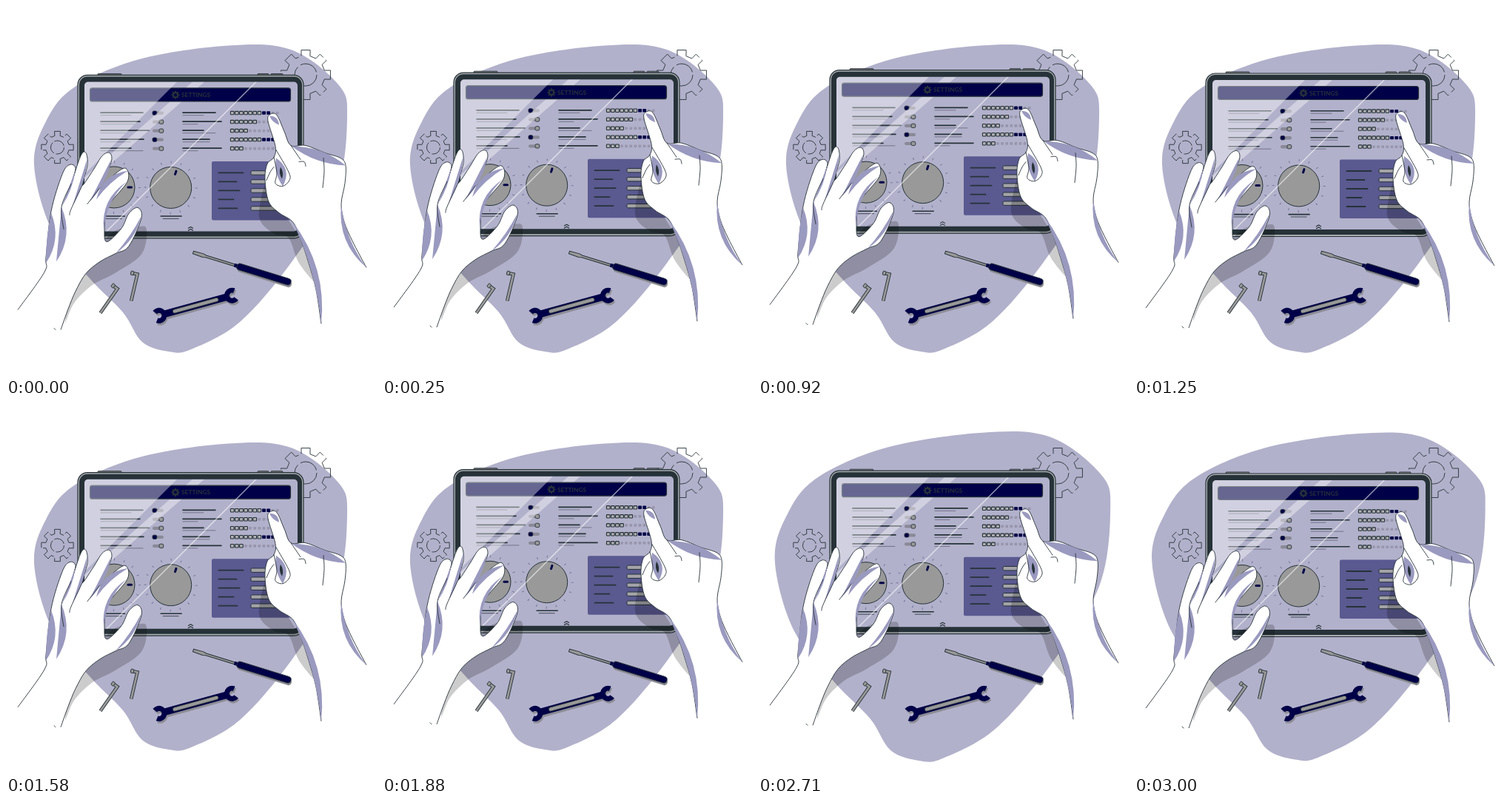
Write an HTML page that moves like this. It is 500 by 500 pixels and loops after 3.04 s.

```html
<!DOCTYPE html>
<html lang="en">
<head>
<meta charset="utf-8">
<title>Settings</title>
<style>
html, body { margin: 0; width: 100%; height: 100%; overflow: hidden; background: #fff }
svg { display: block; width: 100vw; height: 100vh }
text { font: bold 8.4px Lato, sans-serif }
</style>
</head>
<body>
<svg viewBox="0 0 500 500">
  <defs>
    <clipPath id="screen"><rect x="106" y="103" width="288" height="202" rx="5"/></clipPath>
  </defs>
  <g id="blob"></g>
  <g id="still"></g>
  <g id="float"></g>
</svg>
<script>
const DARK = '#263238', NAVY = '#000048', LILAC = '#b2b1cb', SHADE = '#9a99bf', GREY = '#999';
const $ = id => document.getElementById(id);

// Smooth curve through "x,y x,y ..." points
function curve(points, closed) {
  const p = points.split(' ').map(s => s.split(',').map(Number)), n = p.length;
  const at = i => closed ? p[(i + n) % n] : p[Math.max(0, Math.min(n - 1, i))];
  let d = 'M' + p[0];
  for (let i = 0; i < (closed ? n : n - 1); i++) {
    const [a, b, c, e] = [at(i - 1), at(i), at(i + 1), at(i + 2)];
    const lead = [0, 1].map(k => b[k] + (c[k] - a[k]) / 6);
    const tail = [0, 1].map(k => c[k] - (e[k] - b[k]) / 6);
    d += `C${lead} ${tail} ${c}`;
  }
  return d + (closed ? 'Z' : '');
}
const path = (d, fill = 'none', stroke = 'none', width = 1, more = '') =>
  `<path d="${d}" fill="${fill}" stroke="${stroke}" stroke-width="${width}" ${more}/>`;
const shape = (points, fill, more) => path(curve(points, true), fill, 'none', 0, more);
const line = points => path(curve(points), 'none', DARK, .9, 'stroke-linecap="round"');
const rect = (x, y, w, h, r, fill, stroke = 'none', width = .9) =>
  `<rect x="${x}" y="${y}" width="${w}" height="${h}" rx="${r}" fill="${fill}" stroke="${stroke}" stroke-width="${width}"/>`;
const bar = (x, w, y, width = 1.6, stroke = DARK) =>
  path(`M${x} ${y}h${w}`, 'none', stroke, width, 'stroke-linecap="round"');
const circle = (x, y, r, fill, stroke = 'none', more = '') =>
  `<circle cx="${x}" cy="${y}" r="${r}" fill="${fill}" stroke="${stroke}" ${more}/>`;
const place = (x, y, angle, inner) => `<g transform="translate(${x} ${y}) rotate(${angle})">${inner}</g>`;

// Sliver between two arcs that share their ends; each bulge is measured from the chord
function leaf(x1, y1, x2, y2, bulge1, bulge2, fill = SHADE) {
  const len = Math.hypot(x2 - x1, y2 - y1);
  const control = b => [(x1 + x2) / 2 - 2 * b * (y2 - y1) / len, (y1 + y2) / 2 + 2 * b * (x2 - x1) / len];
  return path(`M${x1} ${y1}Q${control(bulge1)} ${x2} ${y2}Q${control(bulge2)} ${x1} ${y1}Z`, fill);
}

function gearPath(x, y, outer, root) {
  const pts = [];
  for (let i = 0; i < 8; i++)
    for (const [off, r] of [[-.23, root], [-.18, outer], [.18, outer], [.23, root]]) {
      const a = i * Math.PI / 4 + off;
      pts.push([(x + r * Math.cos(a)).toFixed(2), (y + r * Math.sin(a)).toFixed(2)]);
    }
  return 'M' + pts.join('L') + 'Z';
}
const gear = (x, y, outer, root, hole) =>
  path(gearPath(x, y, outer, root), 'none', DARK, .9, `stroke-dasharray="${outer * 1.5} ${outer * .13}"`) +
  circle(x, y, hole, 'none', DARK, `stroke-width=".9" stroke-dasharray="${hole * 1.8} ${hole * .3}"`);

function hexKey(x, y, angle, length) {
  const d = `M-8 0H0V${length}`;
  return place(x, y, angle, path(d, 'none', DARK, 4.6) + path(d, 'none', GREY, 2.8) +
    rect(-9, -2.6, 4, 5.2, 1, GREY, DARK));
}

function wrench() {
  const jaw = x => path(`M${x} -7A7 7 0 1 ${x ? 0 : 1} ${x} 7`, 'none');
  const body = color => `<g stroke="${color}" fill="none">
    <path d="M8 0H94" stroke-width="9.5"/>
    <path d="M-4.5-5.5A7 7 0 1 1-4.5 5.5M106.5-5.5A7 7 0 1 0 106.5 5.5" stroke-width="7"/></g>`;
  return place(208.5, 421, -15.4, body('#8c8c94')) +
    place(207, 418.3, -15.4, body(NAVY) + rect(19, -2.6, 64, 5.2, 2.6, GREY, DARK));
}

function screwdriver() {
  return place(254, 336, 17.2, rect(62, -4, 76, 8.5, 4, '#8c8c94')) +
    place(253, 333, 17.2, path('M0-1.8L14-2.4L18-1.4H60V1.4H18L14 2.4L0 1.8Z', GREY, DARK) +
      rect(58, -2.5, 5, 5, 1, NAVY) + rect(62, -4.4, 76, 8.8, 4, NAVY, DARK));
}

const dial = (x, y, angle) =>
  circle(x, y, 34.5, 'none', '#77769b', 'stroke-width="3" pathLength="160" stroke-dasharray=".8 9.2"') +
  circle(x, y, 28, GREY, DARK) +
  place(x, y, angle, path('M0-19V-23.5', 'none', NAVY, 3, 'stroke-linecap="round"')) +
  bar(x - 13.5, 28, 284.6) + bar(x - 10.5, 21, 288, .8);

function settingRow(i) {
  const y = 145.2 + 12 * i, on = i % 3 == 0;
  const left = [57, 53, 65, 58, 41][i], right = [44, 52, 28, 36, 52][i];
  const lit = [7, 6, 4, 7, 3][i], navy = on ? 2 + i / 3 : 0;
  let s = bar(128, left, y - .5) + bar(128, 98 - left, y + 3, .7, '#555a6a') +
    bar(239, right, y - .5) + bar(239, 72 - right, y + 3, .7, '#555a6a') +
    rect(198, y - 2.2, 15, 4.4, 2, '#8a8998') +
    rect(on ? 198 : 207, y - 2.7, 5.8, 5.4, 1.8, on ? NAVY : GREY, DARK);
  for (let k = 0; k < 11; k++) {
    const x = 303.4 + 6.1 * k;
    s += k < lit ? rect(x, y - 2.3, 4.7, 4.4, .8, '#b0b0b4', DARK, 1.1)
      : k < lit + navy ? rect(x, y - 2.3, 4.9, 4.4, .8, NAVY)
      : rect(x + .4, y - 1.8, 3.8, 3.6, .8, '#9796ad');
  }
  return s;
}

function panelRow(i) {
  const y = 226 + 12 * i;
  return bar(287.5, [33, 24, 28, 20, 25][i], y, 1.8) + rect(331, y - 2.7, 44, 5.4, 1.6, '#a3a3a8', DARK, 1);
}

function tablet() {
  const five = [0, 1, 2, 3, 4];
  const gloss = (d, opacity) => path(d, '#fff', 'none', 0, `opacity="${opacity}"`);
  return [[124, 32], [340, 15], [358, 16]].map(([x, w]) => rect(x, 92, w, 4, 1, '#777', DARK)).join('') +
    rect(97, 94, 305, 220.5, 13, '#a9adb0', DARK, 1.2) +
    rect(99, 96, 301, 216, 11, DARK) +
    rect(106, 103, 288, 202, 5, LILAC) +
    '<g clip-path="url(#screen)">' +
    five.map(settingRow).join('') +
    rect(278, 210.5, 107, 79.5, 2, '#5a5990') + five.map(panelRow).join('') +
    dial(146, 245.5, 90) + dial(222.7, 246, 18) +
    path('M246 301L249.5 299L253 301M246 304L249.5 302L253 304', 'none', DARK, 1.1) +
    gloss('M252 103H268L106 245V232Z', .4) +
    rect(113.5, 111.5, 271, 18, 3, NAVY, DARK, 1.2) +
    gloss('M106 103H231L106 228Z', .4) +
    gloss('M337 103H339L137 305H135Z', .6) + '</g>' +
    path(gearPath(229, 120.7, 5.6, 4.2), DARK) + circle(229, 120.7, 2, NAVY) +
    `<text x="237" y="123.8" fill="${DARK}">SETTINGS</text>`;
}

function shadows() {
  const dim = 'opacity=".2"';
  return shape('140,310 178,299 190,303 183,336 148,361 116,378 92,402 80,428 92,380', '#000', dim) +
    shape('354,235 342,285 362,308 382,314 396,348 421,376 412,340 370,270', '#000', dim);
}

function leftHand() {
  const outline = '16,411 52,360 54,340 61,278 76,228 86,215 94,220 88,241 101,203 108,199 110,216 103,243 ' +
    '118,222 130,203 140,199 142,212 126,247 148,227 162,220 164,238 138,272 133,306 137,319 ' +
    '156,301 166,281 178,273 183,287 166,325 148,335 127,346 108,362 94,386 84,410 74,438';
  return path(curve(outline), '#fff', DARK, .9) +
    leaf(94, 222, 75, 272, -3, 0) + leaf(110, 206, 90, 270, -4, 0) + leaf(142, 208, 113, 265, -5, 0) +
    leaf(165, 223, 122, 262, 10, 3) + leaf(163, 238, 132, 304, 7, 11) +
    leaf(61, 280, 54, 348, 2, -9) + leaf(75, 272, 68, 346, -10, 0) + leaf(183, 284, 148, 335, -6, -2) +
    line('88,241 75,272 78,302') + line('103,243 88,275 86,283') + line('126,247 110,268') + line('65,436 67,438');
}

function rightHand() {
  const outline = '426,430 419,384 409,348 399,318 388,293 369,280 355,265 350,235 353,214 362,205 364,190 ' +
    '354,156 357,147 366,148 376,170 385,189 405,189 431,199 452,206 459,216 458,240 453,268 457,292 468,318 487,354';
  return path(curve(outline), '#fff', DARK, .9) +
    leaf(386, 190, 459, 216, -7, 6) + leaf(453, 269, 487, 354, 6, 12) + leaf(388, 293, 426, 430, -6, -14) +
    leaf(356, 149, 369, 161, -4, 2) + leaf(365, 206, 374, 244, -9, 4) + leaf(371, 218, 373, 234, -2, 2, DARK) +
    line('365,195 382,225 383,236 374,244 364,240 366,226 362,205') + line('385,189 398,208') +
    line('396,211 403,211 405,217') + line('429,206 430,224 428,246') + line('352,236 357,225 362,218');
}

$('blob').innerHTML = shape('38,215 54,156 92,110 180,72 300,53.5 385,59 449,106 461,150 447,247 386,346 ' +
  '316,427 250,464 220,467 184,454 158,414 113,368 62,303', LILAC);
$('still').innerHTML = gear(69.5, 191, 22, 16, 9) + gear(405, 93, 34, 26, 15) +
  hexKey(150.5, 382, 35, 40) + hexKey(177.5, 362.5, 13, 37) + wrench() + screwdriver();
$('float').innerHTML = tablet() + shadows() + leftHand() + rightHand();

function draw(now) {
  const t = now % 3040;
  const phase = (t + 40) % 1520 / 1520;
  const lift = 10 * (1 - Math.abs(2 * phase - 1));
  const swell = 1 + .1 * Math.max(0, 1 - Math.abs(t - 2840) / 460);
  $('float').setAttribute('transform', `translate(0 ${-lift})`);
  $('blob').setAttribute('transform', `translate(250 260) scale(${swell}) translate(-250 -260)`);
  requestAnimationFrame(draw);
}
draw(performance.now());
</script>
</body>
</html>
```
